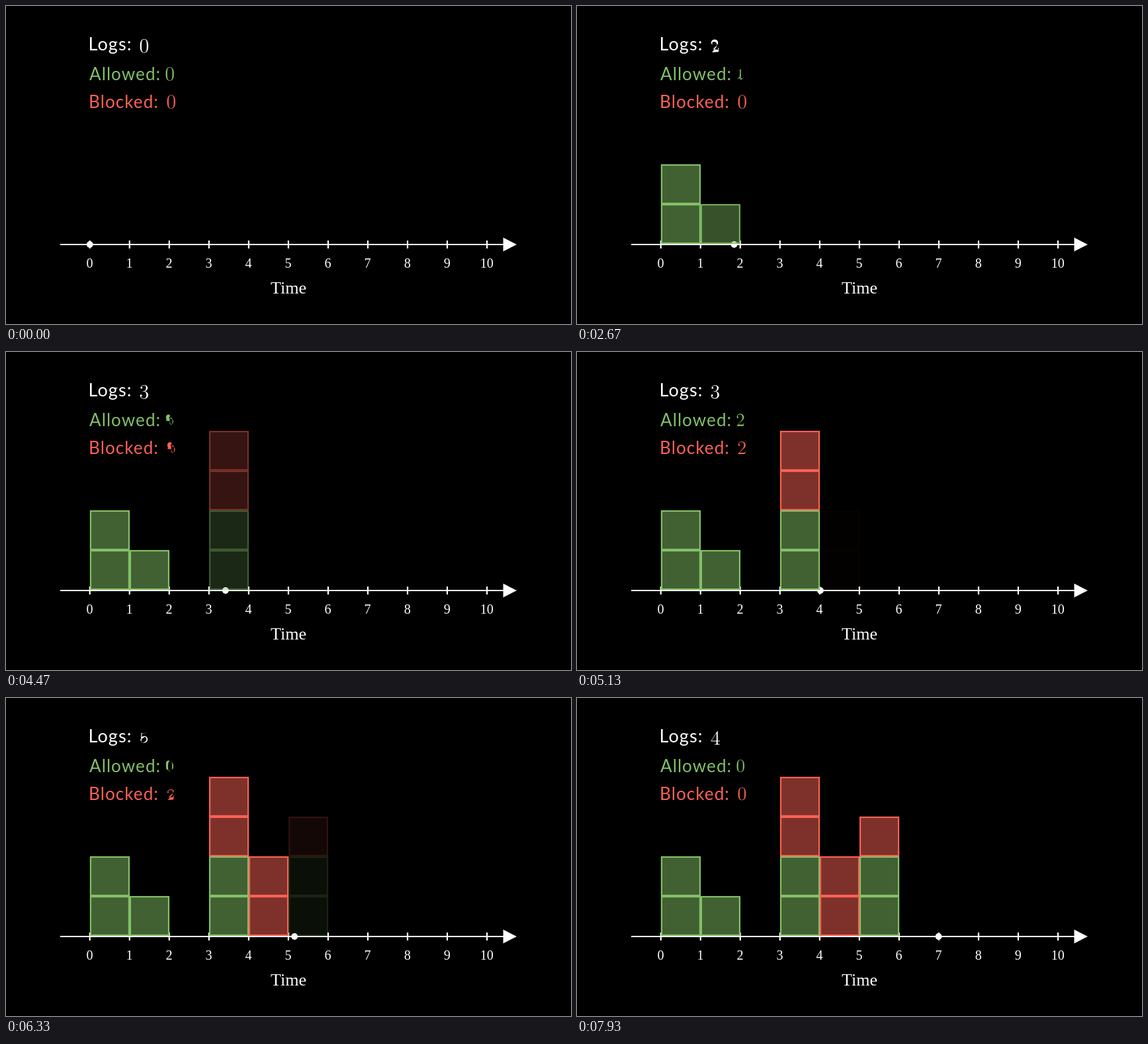
An HTML page for the animation above (8000 ms loop, 854x480 px).

```html
<!DOCTYPE html>
<html lang="en">
<head>
<meta charset="utf-8">
<title>Sliding window log</title>
<style>
  html, body { margin: 0; width: 100%; height: 100%; overflow: hidden; background: #000; }
  svg { display: block; width: 100vw; height: 100vh; }
  .label { font: 26px Lato, "Open Sans", sans-serif; letter-spacing: 1.1px; }
  .axis { font: 20px "Liberation Serif", "Times New Roman", serif; fill: #fff; text-anchor: middle; }
  .axis .title { font-size: 26px; }
  .box { stroke-width: 2.2; }
</style>
</head>
<body>
<svg viewBox="0 0 854 480">
  <g class="label">
    <text x="124.5" y="67" fill="#fff" font-size="27">Logs:</text>
    <text x="126" y="112" fill="#83c167">Allowed:</text>
    <text x="125" y="154" fill="#fc6255">Blocked:</text>
  </g>
  <g id="axis" class="axis">
    <path d="M82 360H753" stroke="#fff" stroke-width="2.2"/>
    <path d="M751.5 349.5L772 360L751.5 370.5Z"/>
    <text class="title" x="427" y="434">Time</text>
  </g>
  <circle id="dot" cy="360" r="4.9" fill="#fff"/>
  <g id="columns"></g>
  <g id="counters"></g>
</svg>
<script>
const GREEN = '#83c167', RED = '#fc6255';
const LOOP = 8000, FPS = 15, WINDOW = 4;
const ORIGIN = 126.7, UNIT = 60.03;
const EM = 1195.5, SAMPLES = 320;

const allowed = [2, 1, 0, 2, 0, 2, 0];
const blocked = [0, 0, 0, 2, 2, 1, 0];
const logs = allowed.map((_, i) =>
  allowed.slice(Math.max(0, i - WINDOW), i).reduce((a, b) => a + b, 0));

// Digit outlines, baseline at y = 0
const DIGITS = {
  0: 'M536 -383C536 -482 530 -579 487 -669C438 -769 351 -795 293 -795C224 -795 139 -760 94 -661C61 -586 49 -512 49 -383C49 -267 57 -179 100 -94C147 -4 230 25 292 25C396 25 455 -37 490 -106C533 -196 536 -313 536 -383' +
     'M292 1C253 1 176 -20 153 -151C140 -222 140 -313 140 -397C140 -495 140 -583 159 -654C179 -734 240 -771 292 -771C337 -771 406 -744 429 -641C445 -573 445 -478 445 -397C445 -317 445 -226 432 -153C409 -22 334 1 292 1',
  1: 'M344 -766C344 -794 344 -795 320 -795C292 -763 232 -719 109 -719L109 -684C136 -684 196 -684 262 -715L262 -92C262 -49 258 -35 153 -35L116 -35L116 0C148 -2 264 -2 304 -2C343 -2 458 -2 490 0L490 -35L453 -35C348 -35 344 -49 344 -92L344 -766',
  2: 'M526 -201L500 -201C496 -181 487 -115 475 -96C466 -85 398 -85 362 -85L141 -85C173 -112 246 -189 277 -218C459 -385 526 -447 526 -565C526 -703 417 -795 279 -795C140 -795 59 -677 59 -574C59 -513 111 -513 115 -513C140 -513 171 -531 171 -569C171 -603 148 -625 115 -625C104 -625 102 -625 98 -624C121 -705 185 -760 263 -760C365 -760 427 -675 427 -565C427 -464 368 -375 300 -299L59 -29L59 0L495 0L526 -201',
  3: 'M220 -429C200 -428 195 -427 195 -416C195 -404 201 -404 222 -404L277 -404C379 -404 424 -320 424 -206C424 -49 343 -7 285 -7C227 -7 129 -35 94 -114C133 -108 167 -129 167 -172C167 -207 142 -231 109 -231C80 -231 49 -214 49 -169C49 -62 155 25 288 25C430 25 536 -84 536 -204C536 -314 447 -400 332 -421C436 -451 503 -538 503 -631C503 -726 405 -795 289 -795C170 -795 81 -722 81 -635C81 -587 118 -577 136 -577C161 -577 190 -595 190 -631C190 -669 161 -686 135 -686C128 -686 126 -686 122 -685C167 -766 280 -766 286 -766C325 -766 403 -748 403 -631C403 -609 399 -542 365 -490C329 -438 288 -434 256 -433L220 -429',
  4: 'M432 -778C432 -801 432 -807 415 -807C405 -807 402 -807 392 -793L32 -234L32 -200L347 -200L347 -91C347 -47 344 -35 257 -35L233 -35L233 0C261 -2 355 -2 389 -2C422 -2 518 -2 545 0L545 -35L521 -35C435 -35 432 -47 432 -91L432 -200L552 -200L552 -234L432 -234L432 -778' +
     'M353 -685L353 -234L62 -234L353 -685',
  5: 'M153 -685C204 -668 246 -667 259 -667C395 -667 481 -766 481 -783C481 -788 478 -794 471 -794C469 -794 466 -794 455 -789C389 -760 331 -757 300 -757C221 -757 165 -781 142 -790C134 -794 132 -794 130 -794C121 -794 121 -787 121 -768L121 -412C121 -391 121 -384 135 -384C141 -384 142 -385 154 -399C188 -448 244 -477 304 -477C367 -477 398 -418 408 -398C428 -351 429 -293 429 -247C429 -202 429 -134 396 -80C369 -37 323 -7 270 -7C191 -7 114 -61 92 -148C98 -146 105 -145 111 -145C132 -145 164 -157 164 -197C164 -231 141 -250 111 -250C90 -250 59 -239 59 -192C59 -91 140 25 273 25C408 25 526 -88 526 -240C526 -383 430 -501 305 -501C237 -501 184 -471 153 -438L153 -685'
};

const $ = id => document.getElementById(id);
const clamp = v => Math.min(1, Math.max(0, v));
const mix = (a, b, p) => a + (b - a) * p;

function add(parent, tag, attrs, text = '') {
  const el = document.createElementNS('http://www.w3.org/2000/svg', tag);
  for (const key in attrs) el.setAttribute(key, attrs[key]);
  el.textContent = text;
  return parent.appendChild(el);
}

// Sigmoid ease with steepness 10
function smooth(x) {
  const sigmoid = v => 1 / (1 + Math.exp(-v));
  const edge = sigmoid(-5);
  return clamp((sigmoid(10 * (clamp(x) - .5)) - edge) / (1 - 2 * edge));
}

function parseContour(d) {
  const curves = [];
  let pen;
  for (const [, cmd, args] of d.matchAll(/([MLC])([^MLC]*)/g)) {
    const n = args.trim().split(/\s+/).map(Number);
    const end = n.slice(-2);
    if (cmd === 'L') curves.push([pen, pen.map((v, i) => mix(v, end[i], 1 / 3)), pen.map((v, i) => mix(v, end[i], 2 / 3)), end]);
    if (cmd === 'C') curves.push([pen, n.slice(0, 2), n.slice(2, 4), end]);
    pen = end;
  }
  return curves;
}

function bezier([a, b, c, d], t) {
  const s = 1 - t;
  return [0, 1].map(i => s * s * s * a[i] + 3 * s * s * t * b[i] + 3 * s * t * t * c[i] + t * t * t * d[i]);
}

// Every curve of a contour gets an equal share of the samples
function sampleContour(curves) {
  return Array.from({ length: SAMPLES + 1 }, (_, i) => {
    const u = i / SAMPLES * curves.length;
    const k = Math.min(curves.length - 1, Math.floor(u));
    return bezier(curves[k], u - k);
  });
}

const outlines = {};
for (const digit in DIGITS) {
  const contours = DIGITS[digit].match(/M[^M]+/g).map(d => sampleContour(parseContour(d)));
  const xs = contours[0].map(p => p[0]), ys = contours[0].map(p => p[1]);
  const left = Math.min(...xs), middle = (Math.min(...ys) + Math.max(...ys)) / 2;
  outlines[digit] = contours.map(c => c.map(([x, y]) => [(x - left) / EM, (y - middle) / EM]));
}

// A contour without a partner shrinks to the end of the other digit's outline
function morph(from, to, p, sizeA, sizeB, x, y) {
  const a = outlines[from], b = outlines[to];
  let d = '';
  for (let c = 0; c < Math.max(a.length, b.length); c++) {
    for (let i = 0; i <= SAMPLES; i++) {
      const s = a[c] ? a[c][i] : a[0][SAMPLES];
      const e = b[c] ? b[c][i] : b[0][SAMPLES];
      const px = x + mix(s[0] * sizeA, e[0] * sizeB, p);
      const py = y + mix(s[1] * sizeA, e[1] * sizeB, p);
      d += (i ? 'L' : 'M') + px.toFixed(2) + ' ' + py.toFixed(2);
    }
    d += 'Z';
  }
  return d;
}

for (let i = 0; i <= 10; i++) {
  const x = ORIGIN + UNIT * i;
  add($('axis'), 'path', { d: `M${x} 354V366`, stroke: '#fff', 'stroke-width': 2.2 });
  add($('axis'), 'text', { x: x - .3, y: 394.7 }, i);
}

const columns = allowed.map((count, i) => {
  const group = add($('columns'), 'g', { class: 'box' });
  for (let row = 0; row < count + blocked[i]; row++) {
    const color = row < count ? GREEN : RED;
    add(group, 'rect', { x: 127.9 + UNIT * i, y: 300 - 60 * row, width: 58, height: 58, fill: color, stroke: color });
  }
  return group;
});

const counters = [
  { values: logs, color: '#fff', x: 202.6, y: 60.3, first: 30.5, size: 30.5 },
  { values: allowed, color: GREEN, x: 241.5, y: 102.5, first: 30, size: 28 },
  { values: blocked, color: RED, x: 243.6, y: 144.6, first: 30, size: 28.5 }
].map(c => ({ ...c, values: [0, ...c.values], el: add($('counters'), 'path', { fill: c.color }) }));

function draw(seconds) {
  const time = Math.max(0, seconds - 1);
  const step = Math.min(allowed.length - 1, Math.floor(time + 1e-6));
  const p = smooth(time - step);
  $('dot').setAttribute('cx', ORIGIN + UNIT * (step + p));
  columns.forEach((el, i) => {
    const shown = smooth(time - i);
    el.setAttribute('stroke-opacity', shown);
    el.setAttribute('fill-opacity', shown / 2);
  });
  for (const { el, values, x, y, first, size } of counters) {
    const start = values.slice(0, step + 1).every(v => v === 0) ? first : size;
    const end = start === first && values[step + 1] === 0 ? first : size;
    el.setAttribute('d', morph(values[step], values[step + 1], p, start, end, x, y));
  }
}

const origin = performance.now();
function tick() {
  const elapsed = Math.max(0, performance.now() - origin) % LOOP;
  draw(Math.floor(elapsed * FPS / 1000 + .1) / FPS);
  requestAnimationFrame(tick);
}
tick();
</script>
</body>
</html>
```
